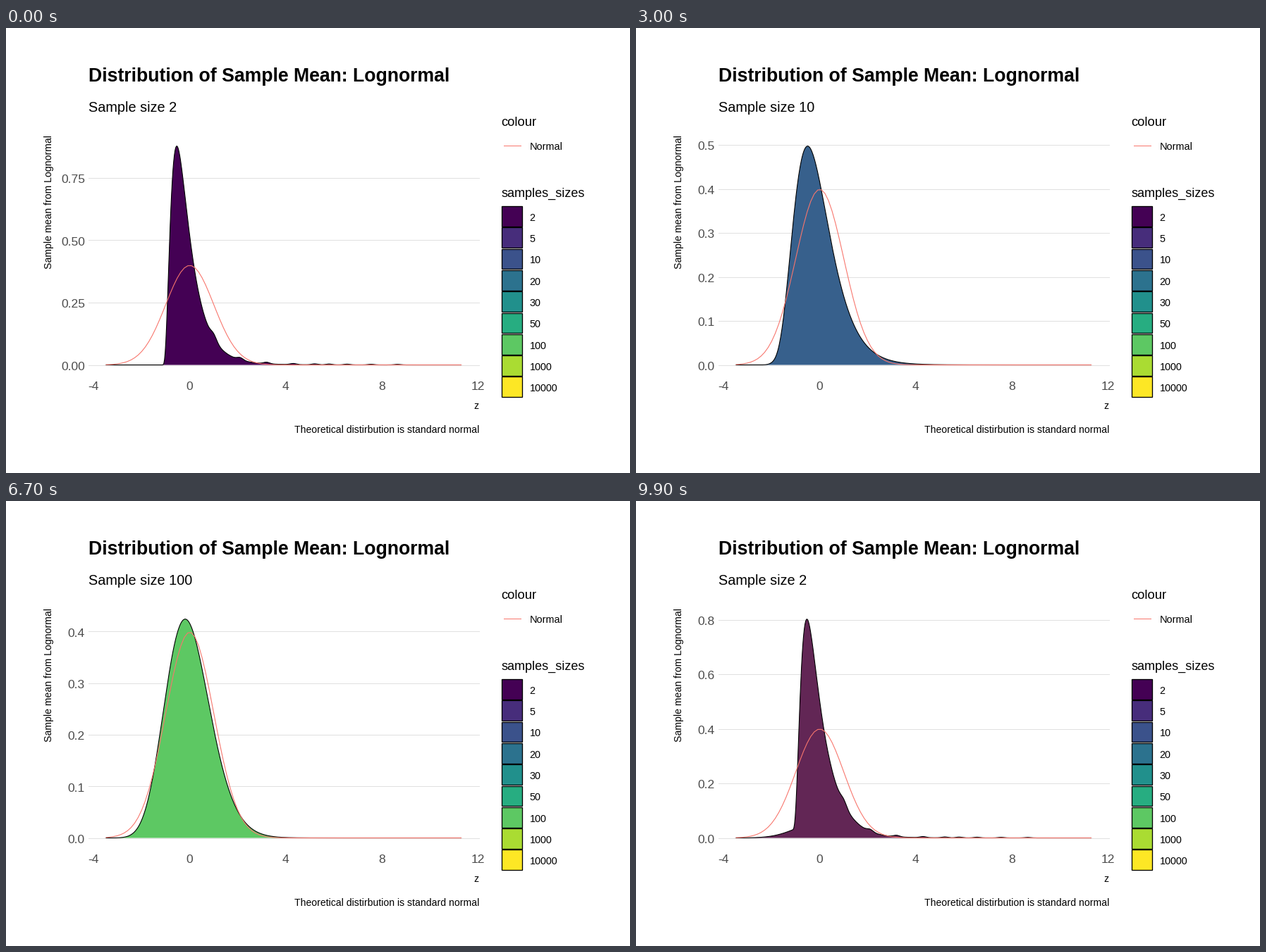
A matplotlib script for the animation above (10000 ms loop, 885x632 px).

```python
import numpy as np
import matplotlib.pyplot as plt
from matplotlib.animation import FuncAnimation
from matplotlib.colors import to_rgb
from matplotlib.patches import Polygon, Rectangle

W, H, DPI = 885, 632, 100
X0, UNIT = 260.6, 34.06          # pixel of z = 0, pixels per z unit
BASE, RISE = 478.5, 310.8        # baseline and height of the highest point
LEFT, RIGHT = 117, 671
SALMON = "#F8766D"
SIZES = [2, 5, 10, 20, 30, 50, 100, 1000, 10000]
PEAKS = [0.878, 0.578, 0.515, 0.475, 0.46, 0.44, 0.4243, 0.404, 0.404]
MODES = [-0.54, -0.55, -0.53, -0.46, -0.38, -0.28, -0.19, 0, 0]
FILLS = ["#440154", "#472D7B", "#3B528B", "#2C728E", "#21908C",
         "#27AD81", "#5DC863", "#AADC32", "#FDE725"]
OUTLIERS = [1, 2.1, 3.2, 4.3, 5.2, 5.8, 6.55, 7.55, 8.65]
HOLD, SLOW, FAST = 4, 8, 7       # frames per pause and per change
COUNT = 100


# ---- densities -------------------------------------------------------------
def normal(x):
    return np.exp(-0.5 * x ** 2) / np.sqrt(2 * np.pi)


def mean_density(x, n, peak, mode):
    """Lognormal of unit area whose skew shrinks with the sample size."""
    s2 = np.log(1 + (np.e - 1) / (n + 2))
    scale = 1 / (peak * np.sqrt(2 * np.pi * s2) * np.exp(s2 / 2))
    y = np.maximum(1 + (x - mode) / scale, 1e-9)
    return peak * np.exp(-np.log(y) ** 2 / (2 * s2))


z = np.linspace(-3.48, 11.3, 512)
zn = np.linspace(z[0], z[-1], 101)
px = X0 + UNIT * z
DENS = [mean_density(z, *p) for p in zip(SIZES, PEAKS, MODES)]
# the smallest samples leave single bumps far out in the tail
DENS[0] += sum(0.02 / c * np.exp(-((z - c) / 0.18) ** 2) for c in OUTLIERS)


# ---- colour blending in CIE Lab ----------------------------------------------
M = np.array([[0.4124, 0.3576, 0.1805], [0.2126, 0.7152, 0.0722],
              [0.0193, 0.1192, 0.9505]])
WHITE = M.sum(axis=1)


def to_lab(c):
    c = np.array(to_rgb(c))
    lin = np.where(c > 0.04045, ((c + 0.055) / 1.055) ** 2.4, c / 12.92)
    r = M @ lin / WHITE
    f = np.where(r > 0.008856, np.cbrt(r), 7.787 * r + 16 / 116)
    return np.array([116 * f[1] - 16, 500 * (f[0] - f[1]), 200 * (f[1] - f[2])])


def from_lab(lab):
    fy = (lab[0] + 16) / 116
    f = np.array([fy + lab[1] / 500, fy, fy - lab[2] / 200])
    r = np.where(f > 0.2069, f ** 3, (f - 16 / 116) / 7.787)
    lin = np.clip(np.linalg.solve(M, r * WHITE), 0, 1)
    return np.clip(np.where(lin > 0.0031308,
                            1.055 * lin ** (1 / 2.4) - 0.055, 12.92 * lin), 0, 1)


LABS = [to_lab(c) for c in FILLS]


# ---- axis breaks ---------------------------------------------------------------
def breaks(peak):
    """Best step from zero by simplicity, coverage and density of the labels."""
    lo, hi = -0.05 * peak, 1.05 * peak
    best = (-9, 0, 0)
    for step, simple in ((0.1, 1), (0.05, 0.8), (0.2, 0.6), (0.25, 0.4)):
        for n in range(2, 10):
            top = n * step
            cover = 1 - 0.5 * ((hi - top) ** 2 + lo ** 2) / (0.1 * (hi - lo)) ** 2
            ratio = (max(top, hi) - lo) / (4 * step)
            score = 0.25 * simple + 0.2 * cover + 0.5 * (2 - max(ratio, 1 / ratio))
            best = max(best, (score, step, n))
    _, step, n = best
    fmt = "%.2f" if step in (0.25, 0.05) else "%.1f"
    return [(k * step, fmt % (k * step)) for k in range(n + 1) if k * step <= hi]


# ---- stage -----------------------------------------------------------------------
plt.rcParams["font.family"] = "Liberation Sans"
fig = plt.figure(figsize=(W / DPI, H / DPI), dpi=DPI, facecolor="white")
ax = fig.add_axes([0, 0, 1, 1])
ax.set(xlim=(0, W), ylim=(H, 0))
ax.axis("off")


def pt(pixels):
    return pixels * 72 / DPI


def label(x, mid, s, size, ha="left", color="black", **kw):
    """Text whose capitals are centred on the height mid."""
    return ax.text(x, mid + 0.36 * size, s, fontsize=pt(size), ha=ha,
                   va="baseline", color=color, **kw)


def stroke(color, width, zorder, x=(LEFT, RIGHT), y=(0, 0)):
    return ax.plot(x, y, color=color, lw=pt(width), zorder=zorder)[0]


label(LEFT, 66, "Distribution of Sample Mean: Lognormal", 26.6, weight="bold")
subtitle = label(LEFT, 111.5, "", 19.9)
ax.text(60.5, 247, "Sample mean from Lognormal", fontsize=pt(14.1),
        rotation=90, ha="center", va="center")
for v in range(-4, 13, 4):
    label(X0 + v * UNIT, 508, str(v), 17.5, "center", "#4D4D4D")
label(RIGHT, 535.5, "z", 14.1, "right")
label(RIGHT, 570, "Theoretical distirbution is standard normal", 14.05, "right")

label(702.5, 132, "colour", 18.4)
stroke(SALMON, 1, 2, (705.5, 729.5), (166.5, 166.5))
label(742.5, 167.5, "Normal", 14.5)
label(702.5, 233, "samples_sizes", 18)
for k, (size, fill) in enumerate(zip(SIZES, FILLS)):
    mid = 267.4 + 30.3 * k
    ax.add_patch(Rectangle((702.8, mid - 14.4), 28.8, 28.8,
                           fc=fill, ec="black", lw=pt(1.3)))
    label(742.5, mid + 1.2, str(size), 14.4)

grid = [stroke("#E0E0E0", 1, 1) for _ in range(10)]
ticks = [label(112, 0, "", 17.5, "right", "#4D4D4D") for _ in grid]
area = ax.add_patch(Polygon([[0, 0], [1, 1]], closed=True, lw=0, zorder=3))
edge = stroke("black", 1.1, 4, px, 0 * px)
bell = stroke(SALMON, 1.1, 5, X0 + UNIT * zn, 0 * zn)


# ---- motion ------------------------------------------------------------------------
def timeline():
    for k in range(len(SIZES)):
        n = SLOW if k < 2 else FAST
        for _ in range(HOLD):
            yield k, 0.0
        for i in range(1, n + 1):
            yield k, i / n


FRAMES = list(timeline())[:COUNT]


def draw(i):
    k, t = FRAMES[i]
    nxt = (k + 1) % len(SIZES)
    dens = (1 - t) * DENS[k] + t * DENS[nxt]
    peak = dens.max()
    scale = RISE / peak
    top = BASE - scale * dens

    area.set_xy(np.column_stack([np.r_[px, px[-1], px[0]], np.r_[top, BASE, BASE]]))
    area.set_facecolor(from_lab((1 - t) * LABS[k] + t * LABS[nxt]))
    edge.set_ydata(top)
    bell.set_ydata(BASE - scale * normal(zn))
    subtitle.set_text(f"Sample size {SIZES[nxt if t > 0.5 else k]}")

    marks = breaks(peak)
    for j, (line, tick) in enumerate(zip(grid, ticks)):
        shown = j < len(marks)
        line.set_visible(shown)
        tick.set_visible(shown)
        if shown:
            value, s = marks[j]
            y = BASE - scale * value
            line.set_ydata([y, y])
            tick.set_text(s)
            tick.set_y(y + 1 + 0.36 * 17.5)
    return [area, edge, bell, subtitle, *grid, *ticks]


anim = FuncAnimation(fig, draw, frames=COUNT, interval=100, repeat=True,
                     repeat_delay=0, blit=False)
plt.show()
```
